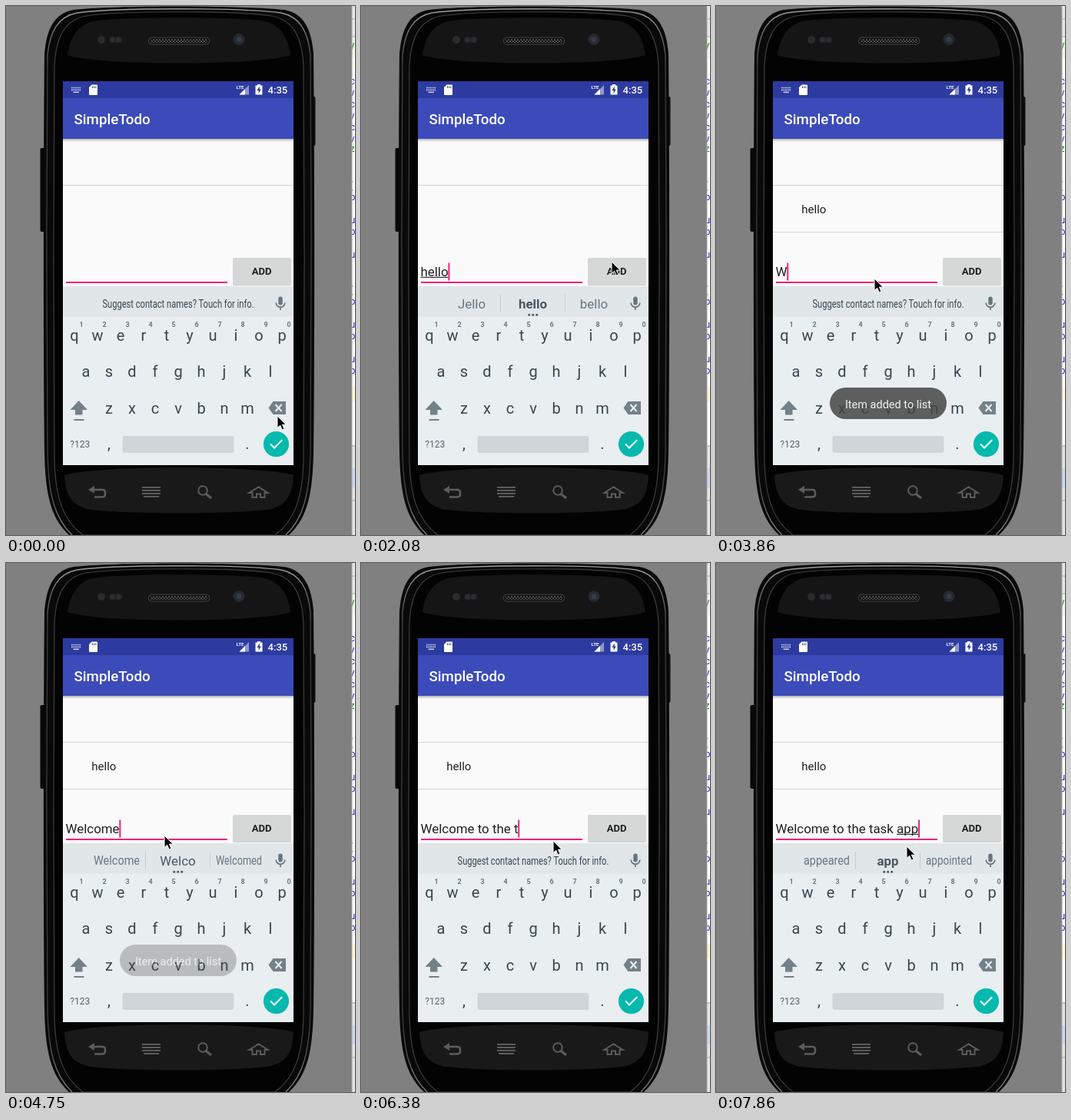
Recreate the animation shown at these times as an HTML page. Size 454 px wide and 689 px high, loop 8000 ms.

```html
<!DOCTYPE html>
<html lang="en">
<head>
<meta charset="utf-8">
<title>Todo list on a phone</title>
<style>
html, body { margin: 0; width: 100%; height: 100%; overflow: hidden; background: #808080; }
svg { display: block; width: 454px; height: 689px; }
text { font-family: Roboto, "Noto Sans", sans-serif; white-space: pre; }
.mid { text-anchor: middle; }
.key { font-size: 20px; fill: #37474f; text-anchor: middle; }
.digit { font-size: 9px; font-weight: 700; fill: #6b7980; text-anchor: middle; }
.word { font-size: 16.9px; fill: #68777f; text-anchor: middle; }
.input { font-size: 16.9px; fill: #212121; }
.nav { fill: none; stroke: #5c5c5c; stroke-width: 2; }
</style>
</head>
<body>
<svg id="stage" viewBox="0 0 454 689" xmlns="http://www.w3.org/2000/svg">
  <defs>
    <linearGradient id="rim" x1="0" y1="0" x2="0" y2="689" gradientUnits="userSpaceOnUse">
      <stop offset="0" stop-color="#a2a2a2"/>
      <stop offset=".12" stop-color="#3c3c3c"/>
      <stop offset=".88" stop-color="#3c3c3c"/>
      <stop offset="1" stop-color="#808080"/>
    </linearGradient>
    <linearGradient id="shade" x1="0" y1="0" x2="0" y2="1">
      <stop offset="0" stop-color="#000" stop-opacity=".28"/>
      <stop offset="1" stop-color="#000" stop-opacity="0"/>
    </linearGradient>
    <pattern id="mesh" width="4" height="4" patternUnits="userSpaceOnUse">
      <path d="M0 0L4 4M4 0L0 4" stroke="#5a5a5a" stroke-width=".8"/>
    </pattern>
    <clipPath id="strip"><rect x="450" width="4" height="689"/></clipPath>
  </defs>

  <rect width="454" height="689" fill="#808080"/>

  <!-- Window edge behind the phone -->
  <g clip-path="url(#strip)">
    <rect x="450" width="4" height="689" fill="#fff"/>
    <rect x="450" width="4" height="40" fill="#e6e6e6"/>
    <rect x="450" y="40" width="4" height="28" fill="#f4f6ea"/>
    <rect x="450" y="496" width="4" height="19" fill="#fff8d8"/>
    <rect x="450" y="572" width="4" height="117" fill="#e4e4e4"/>
    <rect x="450" y="602" width="4" height="25" fill="#cbd9ea"/>
    <path d="M450 17h4M450 40h4M450 573h4M450 644h4" stroke="#a5a5a5"/>
    <g id="code" font-size="12"></g>
  </g>
  <path d="M450 0V689" stroke="#a8a8a8"/>

  <!-- Phone body -->
  <rect x="44.500" y="185" width="7" height="109" rx="2" fill="#080808"/>
  <rect x="396" y="118" width="6.500" height="64" rx="2" fill="#111"/>
  <path d="M88 5C135 -1 315 -1 362 5C388 10 397 30 400 62C401.500 200 401.500 480 400 580C399 636 392 667 368 689H82C58 667 51 636 50 580C48.500 480 48.500 200 50 62C53 30 62 10 88 5Z" fill="#090909"/>
  <path d="M86 689C63 667 55 636 54 580C52.500 480 52.500 200 54 64C57 34 67 14 92 9C140 2 310 2 358 9C383 14 393 34 396 64C397.500 200 397.500 480 396 580C395 636 387 667 364 689" fill="none" stroke="url(#rim)" stroke-width="1.300"/>
  <path d="M104 13C148 6 302 6 346 13C372 18 385 38 387 78C388.500 200 388.500 480 387 590C386 640 376 670 350 689H100C74 670 64 640 63 590C61.500 480 61.500 200 63 78C65 38 78 18 104 13Z" fill="#030303" stroke="#3e3e3e" stroke-width="1.200"/>
  <path d="M80 64C84 35 98 22 118 19C160 14 290 14 332 19C352 22 366 35 370 64C330 78 120 78 80 64Z" fill="#151515"/>
  <path d="M76 611C120 598 330 598 374 611C373 640 362 652 340 656C290 662 160 662 110 656C88 652 77 640 76 611Z" fill="#191919"/>
  <g>
    <rect x="185.500" y="41" width="79" height="9" rx="4" fill="#111" stroke="#444"/>
    <rect x="188" y="43" width="74" height="5" fill="url(#mesh)"/>
    <circle cx="124" cy="44" r="5" fill="#2b2b2b"/>
    <rect x="134" y="39.500" width="18" height="9" rx="4.500" fill="#1d1d1d"/>
    <circle cx="138.500" cy="44" r="3.500" fill="#2b2d33"/>
    <circle cx="146.500" cy="44" r="3.500" fill="#2b2d33"/>
    <circle cx="303" cy="43.500" r="7.500" fill="#252a31"/>
    <circle cx="303" cy="43.500" r="3.500" fill="#333c49"/>
  </g>
  <g class="nav">
    <path d="M113 630H125Q129 630 129 633.500V636Q129 639.500 125 639.500H115" stroke-width="2.600"/>
    <path d="M107 630L115 625V635Z" fill="#5c5c5c" stroke="none"/>
    <path d="M177 627H201M177 631H201M177 635H201M179 639H199"/>
    <circle cx="256" cy="631" r="5.800"/>
    <path d="M260 635.500L267 641" stroke-width="3"/>
    <path d="M316.500 634L328.500 626.500L340.500 634H336.500V640H331V635.500H326V640H320.500V634Z"/>
  </g>

  <!-- App -->
  <rect x="74" y="98" width="300" height="500" fill="#fafafa"/>
  <rect x="74" y="98" width="300" height="22" fill="#2d3a9f"/>
  <rect x="74" y="120" width="300" height="53" fill="#3c4bba"/>
  <rect x="74" y="173" width="300" height="4" fill="url(#shade)"/>
  <g fill="#fff">
    <path d="M85 106.500H98M85 109.300H98" stroke="#cdd1ea" stroke-width="1.700" stroke-dasharray="1.700 .900"/>
    <path d="M87.500 112.300H95" stroke="#cdd1ea" stroke-width="1.500"/>
    <path d="M111.500 102.500H118Q119 102.500 119 103.500V115Q119 116 118 116H109Q108 116 108 115V106Z"/>
    <path d="M112.500 104.500V107M114.700 104.500V107M116.900 104.500V107" stroke="#2d3a9f"/>
    <text x="299.500" y="107.500" font-size="6.200" font-weight="700">LTE</text>
    <path d="M316 103V115.500H303.500Z" fill="#8f97ce"/>
    <path d="M311 108V115.500H303.500Z"/>
    <path d="M327 103.500V102H331V103.500H333.500V115.500H324.500V103.500Z"/>
    <path d="M329.800 104.500L326.500 110H328.600V114L331.800 108.500H329.800Z" fill="#2d3a9f"/>
    <text x="340.500" y="114" font-size="13.100" font-weight="500">4:35</text>
    <text x="88.500" y="154" font-size="18.750" font-weight="500">SimpleTodo</text>
  </g>
  <path d="M74 233.500H374" stroke="#d4d4d4"/>
  <g id="item">
    <text x="111.300" y="270" font-size="15" fill="#212121">hello</text>
    <path d="M74 294.500H374" stroke="#d4d4d4"/>
  </g>
  <rect x="295" y="329" width="76" height="35" rx="2" fill="#b9b9b9" opacity=".7"/>
  <rect x="295" y="328" width="76" height="35" rx="2" fill="#d6d7d7"/>
  <text class="mid" x="332.700" y="350" font-size="13.100" font-weight="700" fill="#212121">ADD</text>
  <rect x="78" y="359" width="210" height="2" fill="#f0207f"/>
  <text id="typed" class="input" x="77.500" y="352"></text>
  <rect id="underline" y="352.800" height="1.100" fill="#212121"/>
  <rect id="caret" y="334.500" width="2" height="23" fill="#f0207f"/>

  <!-- Keyboard -->
  <rect x="74" y="365" width="300" height="40" fill="#e1e6e9"/>
  <rect x="74" y="404.500" width="300" height="193.500" fill="#e9eef1"/>
  <g id="hint"></g>
  <g id="bar">
    <path d="M181.500 376V398M265.500 376V398" stroke="#c6cdd1"/>
    <g id="words"></g>
    <g fill="#4a5960">
      <circle cx="218.700" cy="402.300" r="1.500"/>
      <circle cx="223.700" cy="402.300" r="1.500"/>
      <circle cx="228.700" cy="402.300" r="1.500"/>
    </g>
  </g>
  <g fill="none" stroke="#66757c" stroke-width="1.700">
    <rect x="354.300" y="378.500" width="5.400" height="11" rx="2.700" fill="#66757c" stroke="none"/>
    <path d="M351.200 386.500A5.800 5.800 0 0 0 362.800 386.500M357 392V396"/>
  </g>
  <g id="keys"></g>
  <g fill="#738188">
    <path d="M94.700 514L106 526H99.500V532.500H90V526H83.500Z"/>
    <rect x="88.500" y="538" width="13" height="2"/>
    <path d="M347.500 515H364V532H347.500L341.500 523.500Z"/>
    <path d="M350.500 519L358.500 528M358.500 519L350.500 528" stroke="#e9eef1" stroke-width="2"/>
    <text class="mid" x="96.300" y="575" font-size="12" fill="#53626a">?123</text>
    <rect x="151.500" y="560" width="145" height="22" rx="3" fill="#cfd5d9"/>
  </g>
  <circle cx="351.500" cy="570.700" r="16.600" fill="#05b9ad"/>
  <path d="M344 570.500L349 575.500L359.200 565.300" fill="none" stroke="#fff" stroke-width="2"/>

  <g id="toast">
    <rect x="148" y="497" width="152" height="41" rx="20.500" fill="#424242" fill-opacity=".83"/>
    <text class="mid" x="224" y="524" font-size="14.500" fill="#f2f2f2">Item added to list</text>
  </g>
  <path id="mouse" d="M0 0V15.500L3.700 12.200L6.200 18L8.900 16.800L6.400 11.200H11.300Z" fill="#000" stroke="#fff" stroke-width="1"/>
</svg>

<script>
const LOOP = 8000;
const INPUT_X = 77.5;
const $ = id => document.getElementById(id);

function addText(parent, str, x, y, cls) {
  const el = document.createElementNS("http://www.w3.org/2000/svg", "text");
  el.setAttribute("x", x);
  el.setAttribute("y", y);
  if (cls) el.setAttribute("class", cls);
  el.textContent = str;
  parent.appendChild(el);
  return el;
}

// Long suggestions are narrowed to their column, as the keyboard does.
function fit(el, cx, room) {
  const s = Math.min(1, room / (el.getComputedTextLength() || 1));
  el.setAttribute("transform", `translate(${cx} 0) scale(${s} 1)`);
}

// Tracks hold each value from its time until the next entry.
const typing = [
  [0, ""], [450, "h"], [600, "hel"], [750, "hell"], [890, "hello"], [2370, ""],
  [3860, "W"], [4010, "We"], [4160, "Wel"], [4310, "Welc"], [4450, "Welco"],
  [4600, "Welcom"], [4750, "Welcome"], [4900, "Welcome "], [5050, "Welcome t"],
  [5200, "Welcome to"], [5350, "Welcome to "], [5500, "Welcome to t"],
  [5640, "Welcome to th"], [5790, "Welcome to the"], [6090, "Welcome to the "],
  [6380, "Welcome to the t"], [6530, "Welcome to the ta"], [6680, "Welcome to the tas"],
  [6830, "Welcome to the task"], [7130, "Welcome to the task "],
  [7570, "Welcome to the task a"], [7720, "Welcome to the task ap"],
  [7860, "Welcome to the task app"]
];
const suggestions = [
  [0, ""], [890, "help hel held"], [1040, "Jello hello bello"], [2370, ""],
  [4310, "Well We Went"], [4600, "Welcome Wel Welcomed"], [4750, "Welcome Welco Welcomed"],
  [5050, ""], [5940, "them the then"], [6230, ""],
  [6830, "tasks task tasked"], [7280, ""], [7860, "appeared app appointed"]
];
const marked = [
  [0, ""], [1040, "hello"], [2370, ""], [5940, "the"], [6230, ""],
  [6980, "task"], [7280, ""], [7860, "app"]
];
const caretOn = [[0, 0], [450, 1], [1490, 0], [1930, 1], [2810, 0], [3410, 1]];
const toastAlpha = [[0, 0], [2520, .35], [2670, .85], [2810, 1], [4600, .8], [4750, .34], [4900, 0]];
const pointer = [
  [0, [353, 534]], [1340, [374, 492]], [1490, [381, 448]], [1640, [375, 402]],
  [1780, [354, 362]], [1930, [335, 339]], [2080, [326, 333]], [2520, [296, 341]],
  [2670, [243, 350]], [2810, [208, 353]], [2960, [206, 355]], [6090, [232, 359]],
  [6230, [250, 362]], [7280, [248, 369]]
];

function at(track, t) {
  let value = track[0][1];
  for (const [start, v] of track) if (start <= t) value = v;
  return value;
}

function buildKeys() {
  [["qwertyuiop", 89, 436], ["asdfghjkl", 104, 483], ["zxcvbnm", 134, 530.5]].forEach(([row, x, y]) => {
    [...row].forEach((c, i) => addText($("keys"), c, x + 30 * i, y, "key"));
  });
  for (let i = 0; i < 10; i++) addText($("keys"), (i + 1) % 10, 98 + 30 * i, 418, "digit");
  addText($("keys"), ",", 134, 577, "key");
  addText($("keys"), ".", 314, 577, "key");
}

// Blocks of code lines, each opened by a green line.
function buildCode() {
  const line = (c, y, color) => addText($("code"), c, 447.5, y).setAttribute("fill", color);
  line("i", 32, "#444");
  [["y", 55, 0], ["z", 190, 0], ["(", 238, 6], ["(", 374, 7]].forEach(([c, y, count]) => {
    line(c, y, "#168016");
    for (let i = 1; i <= count; i++) line("uo:"[i % 3], y + 15 * i, "#2020b8");
  });
  for (let i = 0; i < 6; i++) line("cv"[i % 2], 102 + 15 * i, "#2020b8");
}

const hint = addText($("hint"), "Suggest contact names? Touch for info.", 0, 393, "word");
hint.style.fontSize = "15px";
hint.style.fill = "#37474f";
const words = [0, 1, 2].map(() => addText($("words"), "", 0, 393.5, "word"));
const centers = [144, 223.5, 303];
const typed = $("typed");
const show = (el, on) => el.setAttribute("visibility", on ? "visible" : "hidden");

function widthOf(str) {
  typed.textContent = str;
  return str ? typed.getComputedTextLength() : 0;
}

function drawInput(t) {
  const str = at(typing, t), mark = at(marked, t);
  const from = mark ? str.lastIndexOf(mark) : 0;
  const left = widthOf(str.slice(0, from));
  const right = widthOf(str.slice(0, from + mark.length));
  $("underline").setAttribute("x", INPUT_X + left);
  $("underline").setAttribute("width", right - left);
  $("caret").setAttribute("x", INPUT_X + widthOf(str) - .2);
  show($("caret"), at(caretOn, t));
}

function drawBar(t) {
  const list = at(suggestions, t);
  show($("bar"), list);
  show(hint, !list);
  fit(hint, 224, 197);
  if (!list) return;
  list.split(" ").forEach((word, i) => {
    const el = words[i], middle = i === 1;
    el.textContent = word;
    el.style.fontWeight = middle && at(marked, t) ? 700 : 400;
    el.style.fill = middle ? "#4a5960" : "#68777f";
    fit(el, centers[i], 60);
  });
}

function render(t) {
  drawInput(t);
  drawBar(t);
  show($("item"), t >= 2370);
  $("toast").setAttribute("opacity", at(toastAlpha, t));
  $("mouse").setAttribute("transform", `translate(${at(pointer, t)})`);
}

buildKeys();
buildCode();
const begin = performance.now();
function tick() {
  render((performance.now() - begin) % LOOP);
  requestAnimationFrame(tick);
}
tick();
</script>
</body>
</html>
```
